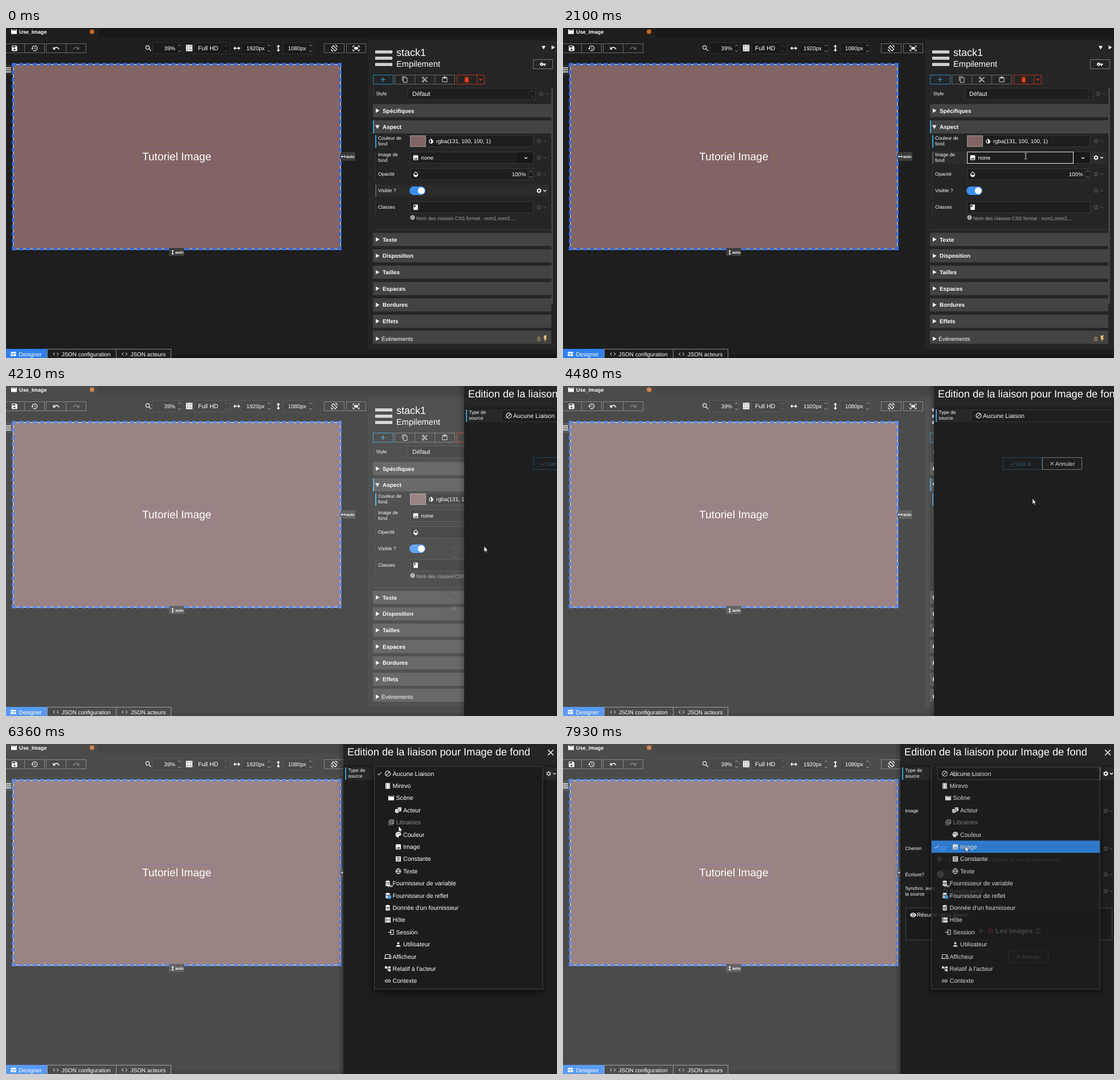
An HTML page for the animation above (8000 ms loop, 967x579 px).

```html
<!DOCTYPE html>
<html lang="fr">
<head>
<meta charset="utf-8">
<title>Liaison d'image</title>
<style>
html, body { margin: 0; width: 100%; height: 100%; overflow: hidden; background: #1e1e1e; }
svg { display: block; font-family: "Liberation Sans", Arial, sans-serif; text-rendering: geometricPrecision; fill-rule: evenodd; }
.b { font-weight: bold; }
.m { font-family: "DejaVu Sans Mono", monospace; }
.e { text-anchor: end; }
</style>
</head>
<body>
<script>
const ICONS = {
  clap: 'M18 4l2 4h-3l-2-4h-2l2 4h-3l-2-4H8l2 4H7L5 4H2v16h20V4z',
  save: 'M17 3H5a2 2 0 0 0-2 2v14a2 2 0 0 0 2 2h14a2 2 0 0 0 2-2V7zM12 19a3 3 0 1 1 0-6 3 3 0 0 1 0 6zm3-10H5V5h10z',
  history: 'M13 3a9 9 0 0 0-9 9H1l4 4 4-4H6a7 7 0 1 1 2 5l-1.4 1.4A9 9 0 1 0 13 3zm-1 5v5l4.3 2.5.7-1.2-3.5-2.1V8z',
  undo: 'M12.5 8c-2.6 0-5 1-6.9 2.6L2 7v9h9l-3.6-3.6A8 8 0 0 1 20 16l2.4-.8A10.5 10.5 0 0 0 12.5 8z',
  redo: 'M11.5 8c2.6 0 5 1 6.9 2.6L22 7v9h-9l3.6-3.6A8 8 0 0 0 4 16l-2.4-.8A10.5 10.5 0 0 1 11.5 8z',
  zoom: 'M15.5 14h-.8l-.3-.3a6.5 6.5 0 1 0-.7.7l.3.3v.8l5 5 1.5-1.5zm-6 0a4.5 4.5 0 1 1 0-9 4.5 4.5 0 0 1 0 9z',
  fit: 'M2 2h20v20H2zM5 5v4l4-4zm10 0l4 4V5zM5 15v4h4zm14 0l-4 4h4zM12 6l-2 3h4zm0 12l2-3h-4zM6 12l3 2v-4zm12 0l-3-2v4z',
  wide: 'M1 12l6-6v4.5h10V6l6 6-6 6v-4.5H7V18z',
  tall: 'M12 1l6 6h-4.5v10H18l-6 6-6-6h4.5V7H6z',
  turn: 'M9 2L2 9l13 13 7-7zM9 5l10 10-4 4L5 9zM15 1a9 9 0 0 1 8 8h-2a7 7 0 0 0-6-6zM9 23a9 9 0 0 1-8-8h2a7 7 0 0 0 6 6z',
  full: 'M1 3h6v2H3v4H1zm16 0h6v6h-2V5h-4zM1 15h2v4h4v2H1zm20 0h2v6h-6v-2h4zM6 8h12v8H6z',
  copy: 'M16 1H4a2 2 0 0 0-2 2v14h2V3h12zm3 4H8a2 2 0 0 0-2 2v14a2 2 0 0 0 2 2h11a2 2 0 0 0 2-2V7a2 2 0 0 0-2-2zm0 16H8V7h11z',
  cut: 'M9.6 7.6A4 4 0 1 0 7.6 9.6L10 12l-2.4 2.4a4 4 0 1 0 2 2L12 14l7 7h3v-1zM6 8a2 2 0 1 1 0-4 2 2 0 0 1 0 4zm0 12a2 2 0 1 1 0-4 2 2 0 0 1 0 4zM19 3l-6 6 2 2 7-7V3z',
  paste: 'M19 3h-4a3 3 0 0 0-6 0H5a2 2 0 0 0-2 2v16h18V5a2 2 0 0 0-2-2zm0 16H5V5h2v3h10V5h2z',
  trash: 'M6 19a2 2 0 0 0 2 2h8a2 2 0 0 0 2-2V7H6zM19 4h-3.5l-1-1h-5l-1 1H5v2h14z',
  key: 'M22 10H12.7a6 6 0 1 0 0 4H15v4h4v-4h3zM7 14a2 2 0 1 1 0-4 2 2 0 0 1 0 4z',
  gear: 'M19.1 12.9a7 7 0 0 0 0-1.9l2-1.6-1.9-3.3-2.4 1a7 7 0 0 0-1.6-.9L14.8 3.6h-3.8l-.4 2.6a7 7 0 0 0-1.6.9l-2.4-1-1.9 3.3 2 1.6a7 7 0 0 0 0 1.9l-2 1.6 1.9 3.3 2.4-1 1.6.9.4 2.6h3.8l.4-2.6 1.6-.9 2.4 1 1.9-3.3zM12.9 15.5a3.5 3.5 0 1 1 0-7 3.5 3.5 0 0 1 0 7z',
  image: 'M21 19V5a2 2 0 0 0-2-2H5a2 2 0 0 0-2 2v14a2 2 0 0 0 2 2h14a2 2 0 0 0 2-2zM8.5 13.5l2.5 3 3.5-4.5 4.5 6H5z',
  half: 'M17.7 7.9L12 2.3 6.3 7.9a8 8 0 1 0 11.4 0zM12 19.6a6 6 0 0 1-4.2-10.2L12 5.1z',
  drop: 'M17.7 8L12 2.3 6.3 8a8 8 0 1 0 11.4 0zM6 14c0-2 .6-3.3 1.8-4.4L12 5.3l4.2 4.3C17.4 10.7 18 12 18 14z',
  book: 'M18 2H6a2 2 0 0 0-2 2v16a2 2 0 0 0 2 2h12a2 2 0 0 0 2-2V4a2 2 0 0 0-2-2zM6 4h5v8l-2.5-1.5L6 12z',
  info: 'M12 2a10 10 0 1 0 0 20 10 10 0 0 0 0-20zm1 15h-2v-6h2zm0-8h-2V7h2z',
  link: 'M3.9 12A3.1 3.1 0 0 1 7 8.9h4V7H7a5 5 0 0 0 0 10h4v-1.9H7A3.1 3.1 0 0 1 3.9 12zM8 13h8v-2H8zm9-6h-4v1.9h4a3.1 3.1 0 0 1 0 6.2h-4V17h4a5 5 0 0 0 0-10z',
  bolt: 'M7 2v11h3v9l7-12h-4l4-8z',
  down: 'M20 12l-1.4-1.4L13 16.2V4h-2v12.2l-5.6-5.6L4 12l8 8z',
  left: 'M12 4l1.4 1.4L7.8 11H21v2H7.8l5.6 5.6L12 20l-8-8z',
  none: 'M12 2a10 10 0 1 0 0 20 10 10 0 0 0 0-20zM4 12a8 8 0 0 1 12.9-6.3L5.7 16.9A8 8 0 0 1 4 12zm8 8a8 8 0 0 1-4.9-1.7L18.3 7.1A8 8 0 0 1 12 20z',
  film: 'M4 2h16v20H4zM6 4v3h2V4zm0 6v3h2v-3zm0 6v3h2v-3zM16 4v3h2V4zm0 6v3h2v-3zm0 6v3h2v-3z',
  masks: 'M10 2h13v8c0 5-4 8-7 7v-7h-6zm4 3v2h2V5zm4 0v2h2V5zM1 8h13v8c0 8-13 8-13 0zm3 4v2h2v-2zm5 0v2h2v-2zm-4 5c1 3 5 3 6 0z',
  books: 'M4 6H2v14a2 2 0 0 0 2 2h14v-2H4zM20 2H8a2 2 0 0 0-2 2v12a2 2 0 0 0 2 2h12a2 2 0 0 0 2-2V4a2 2 0 0 0-2-2zm-1 9H9V9h10zm-4 4H9v-2h6zm4-8H9V5h10z',
  palette: 'M12 2a10 10 0 0 0 0 20c2 0 2.5-1.5 1.5-3s0-3 1.5-3h2a5 5 0 0 0 5-5c0-5-4.5-9-10-9zM5 11a1.5 1.5 0 1 0 3 0 1.5 1.5 0 0 0-3 0zm3-4a1.5 1.5 0 1 0 3 0 1.5 1.5 0 0 0-3 0zm5 0a1.5 1.5 0 1 0 3 0 1.5 1.5 0 0 0-3 0zm3 4a1.5 1.5 0 1 0 3 0 1.5 1.5 0 0 0-3 0z',
  list: 'M3 3h18v18H3zM6 6v2h12V6zm0 5v2h12v-2zm0 5v2h12v-2z',
  base: 'M4 6c0-5 16-5 16 0s-16 5-16 0zm0 3c2 4 14 4 16 0v3c0 5-16 5-16 0zm0 5c2 4 14 4 16 0v4c0 5-16 5-16 0z',
  host: 'M2 3h20v8H2zm2 2v4h3V5zM2 13h20v8H2zm2 2v4h3v-4z',
  login: 'M9 3h12v18H9v-4h2v2h8V5h-8v2H9zM1 11h9L7.5 8.5 9 7l5 5-5 5-1.5-1.5L10 13H1z',
  user: 'M12 4a4 4 0 1 1 0 8 4 4 0 0 1 0-8zM4 20c0-8 16-8 16 0z',
  screens: 'M4 6h18V4H4a2 2 0 0 0-2 2v11H0v3h14v-3H4zM23 8h-6a1 1 0 0 0-1 1v10a1 1 0 0 0 1 1h6a1 1 0 0 0 1-1V9a1 1 0 0 0-1-1zm-1 9h-4v-7h4z',
  tree: 'M22 11V3h-7v3H9V3H2v8h7V8h2v10h4v3h7v-8h-7v3h-2V8h2v3z',
  check: 'M9 16.2L4.8 12l-1.4 1.4L9 19 21 7l-1.4-1.4z',
  close: 'M19 6.4L17.6 5 12 10.6 6.4 5 5 6.4 10.6 12 5 17.6 6.4 19 12 13.4 17.6 19 19 17.6 13.4 12z',
  eye: 'M12 4.5C7 4.5 2.7 7.6 1 12c1.7 4.4 6 7.5 11 7.5s9.3-3.1 11-7.5c-1.7-4.4-6-7.5-11-7.5zM12 17a5 5 0 1 1 0-10 5 5 0 0 1 0 10zm0-8a3 3 0 1 0 0 6 3 3 0 0 0 0-6z',
  tiles: 'M2 4h20v6H2zM2 12h9v8H2zM13 12h9v8h-9z',
  sync: 'M12 4V1L8 5l4 4V6a6 6 0 0 1 5.2 9l1.5 1.5A8 8 0 0 0 12 4zm0 14a6 6 0 0 1-5.2-9L5.3 7.5A8 8 0 0 0 12 20v3l4-4-4-4z'
};

// Markup helpers
const rect = (x, y, w, h, fill = 'none', stroke = 'none', extra = '') =>
  `<rect x="${x}" y="${y}" width="${w}" height="${h}" fill="${fill}" stroke="${stroke}" ${extra}/>`;
const box = (x, y, w, h, fill, stroke = '#383838') => rect(x + .5, y + .5, w - 1, h - 1, fill, stroke);
const text = (x, y, size, s, fill = '#fff', cls = '') =>
  `<text x="${x}" y="${y}" font-size="${size}" fill="${fill}" class="${cls}">${s}</text>`;
const line = (d, color = '#fff', w = 1, extra = '') =>
  `<path d="${d}" fill="none" stroke="${color}" stroke-width="${w}" ${extra}/>`;
const fillPath = (d, color = '#fff') => `<path d="${d}" fill="${color}"/>`;
const dot = (x, y, r, color) => `<circle cx="${x}" cy="${y}" r="${r}" fill="${color}"/>`;
const group = (id, s) => `<g id="${id}">${s}</g>`;
const icon = (name, x, y, size = 12, color = '#fff') =>
  `<path transform="translate(${x - size / 2} ${y - size / 2}) scale(${size / 24})" fill="${color}" d="${ICONS[name]}"/>`;
const chevron = (x, y, color, r = 2.5) => line(`M${x - r} ${y - r / 2}l${r} ${r}l${r} ${-r}`, color, 1.2);
const spin = (x, y, color = '#bbb') =>
  line(`M${x - 2.2} ${y - 4}l2.2-2.2 2.2 2.2M${x - 2.2} ${y + 4}l2.2 2.2 2.2-2.2`, color);
const gear = (x, y, color = '#484848') => icon('gear', x, y, 12, color) + chevron(x + 10.5, y, color);
const DARK = '#1e1e1e';

// Dashed border whose sides each begin and end with a whole dash
function dashes(x, y, w, h, color, size) {
  const side = (d, len) => {
    const n = Math.floor((len + size) / (size * 3));
    return line(d, color, size, `stroke-dasharray="${size * 2} ${(len - n * size * 2) / (n - 1)}"`);
  };
  const m = size / 2;
  return side(`M${x} ${y + m}h${w}`, w) + side(`M${x} ${y + h - m}h${w}`, w) +
    side(`M${x + m} ${y}v${h}`, h) + side(`M${x + w - m} ${y}v${h}`, h);
}

function toolbar() {
  const btn = (x, w, name, c = '#fff') => box(x, 27, w, 17, 'none', '#6a6a6a') + icon(name, x + w / 2, 35.5, 13, c);
  const field = (x, w, s) => box(x, 25, w, 21, '#1a1a1a', '#303030') +
    text(x + w - 13, 39, 9.78, s, '#fff', 'e') + spin(x + w - 5.5, 35.5);
  return rect(162, 0, 805, 16, '#181818') +
    icon('clap', 14, 6.5, 12) + text(23, 10, 9.2, 'Use_Image', '#fff', 'b') + dot(151, 6.5, 4, '#cb661d') +
    btn(-3, 36, 'save') + btn(32, 36, 'history') + btn(70, 36, 'undo') + btn(105, 36, 'redo', '#666') +
    icon('zoom', 250, 35.5, 14) + field(257, 53, '39%') + icon('fit', 321.5, 35, 13.5) +
    box(330, 25, 63, 21, '#1a1a1a', '#303030') + text(337, 39, 10.67, 'Full HD') + spin(385.5, 35.5, '#555') +
    icon('wide', 405, 35.5, 13) + field(413, 54, '1920px') + icon('tall', 478, 35.5, 13) + field(486, 54, '1080px') +
    btn(558, 36, 'turn') + btn(597, 35, 'full');
}

function stage() {
  return rect(0, 65, 11, 17, '#333') + line('M0 70H9M0 73.5H9M0 77H9', '#fff', 1.4) +
    rect(12, 63, 576, 326, '#836464') +
    rect(13, 64, 574, 324, 'none', '#d0cac4', 'stroke-width="1.5"') +
    dashes(10.5, 61.5, 578.5, 328.5, '#3a6fdc', 4) +
    rect(238.5, 211.5, 123, 29, 'none', '#6450aa', 'stroke-opacity=".45"') +
    text(239, 232, 19.1, 'Tutoriel Image') +
    rect(587, 218, 26, 15, '#3c3c3c') + icon('wide', 592, 225.5, 9) + text(597, 228, 6.8, 'auto', '#fff', 'b') +
    rect(286, 386, 27, 14, '#3c3c3c') + icon('tall', 292.5, 393.5, 9) + text(297, 396, 6.8, 'auto', '#fff', 'b');
}

function tabs() {
  const code = x => line(`M${x - 2} 569.5l-2.5 2.5 2.5 2.5M${x + 2} 569.5l2.5 2.5-2.5 2.5`);
  return rect(290, 574, 677, 5, '#171416') + rect(0, 563, 72, 16, '#2f80ee') +
    icon('tiles', 13, 572, 11) + text(22.5, 575.5, 10, 'Designer') +
    box(72, 563, 122, 18, 'none', '#888') + code(87.5) + text(97.5, 575.5, 9.92, 'JSON configuration') +
    box(193, 563, 97, 18, 'none', '#888') + code(208) + text(218.5, 575.5, 9.92, 'JSON acteurs');
}

// Property rows: centre, label lines, input width (0 = none)
const ROWS = [
  { y: 115.5, label: ['Style'], x: 705, w: 225, gx: 939 },
  { y: 198.5, label: ['Couleur de', 'fond'], w: 217 },
  { y: 227.5, label: ['Image de', 'fond'], w: 187 },
  { y: 256.5, label: ['Opacité'], w: 217 },
  { y: 285.5, label: ['Visible ?'], w: 0 },
  { y: 314.5, label: ['Classes'], w: 217 }
];
const labels = (x, y, lines) => lines.length > 1
  ? text(x, y - 2.2, 8.4, lines[0]) + text(x, y + 7.6, 8.4, lines[1])
  : text(x, y + 2.5, 8.4, lines[0]);

function propRow({ y, label, x = 709, w, gx = 935 }, i) {
  const top = y - 10.5;
  return rect(i ? 648 : 645, top, 1, i === 5 ? 28 : 21, '#363636') +
    group('hover' + i, rect(648, top, 305, 21, '#2c2c2c') + rect(648, top, 2, 21, '#5a5a5a')) +
    (i === 1 ? rect(648, top, 2, 22, '#3a9fd8') : '') +
    labels(i ? 653 : 649.5, y, label) + (w ? box(x, top, i === 2 ? 217 : w, 21, DARK) : '') +
    group('gear' + i, gear(gx, y)) + group('gearOn' + i, gear(gx, y, '#fff')) +
    (w ? group('focus' + i, rect(x + .5, top + .5, w - 1, 20, 'none', '#e8e8e8')) : '');
}

function inspector() {
  const btn = (x, w, color) => box(x, 82, w, 17, 'none', color);
  const header = (y, s, open) => rect(644, y - 11.5, 313, 23, '#434343') +
    fillPath(open ? `M648 ${y - 3}h7.5l-3.7 6.5z` : `M649 ${y - 3.7}v7.4l6.5-3.7z`) +
    text(661, y + 3.5, 9.92, s, '#fff', 'b');
  const names = ['Texte', 'Disposition', 'Tailles', 'Espaces', 'Bordures', 'Effets'];
  return rect(635, 22, 332, 541, '#252525') +
    fillPath('M940 31.5h7l-3.5 6z') + fillPath('M957.5 30.5v7l6-3.5z') +
    [39.5, 50.5, 61.5].map(y => rect(648, y, 30, 5, '#eee') + rect(649, y + 2, 28, 1, '#999')).join('') +
    text(685, 49, 18, 'stack1') + text(685, 68, 14.6, 'Empilement') +
    box(925, 55, 35, 17, 'none', '#777') + icon('key', 942.5, 63.5, 12) +
    btn(644, 36, '#2a86b8') + line('M657.5 90.5h8M661.5 86.5v8', '#3ba3e0', 1.2) +
    btn(682, 36, '#666') + btn(717, 36, '#666') + btn(752, 36, '#666') +
    icon('copy', 700, 90.5, 12, '#ccc') + icon('cut', 735, 90.5, 12, '#ccc') + icon('paste', 770, 90.5, 12, '#ccc') +
    btn(791, 36, '#b8321a') + btn(826, 14, '#b8321a') + icon('trash', 808.5, 90.5, 13, '#ff3b14') + chevron(833, 90.5, '#ff3b14') +
    header(145, 'Spécifiques') + header(173.5, 'Aspect', true) + rect(644, 162, 2, 23, '#3a9fd8') +
    ROWS.map(propRow).join('') +
    text(713, 119, 10.67, 'Défaut') + spin(923, 115.5, '#555') +
    rect(709.5, 189, 27, 19, '#836464', '#999') + icon('half', 746, 198.5, 11) + text(755, 202, 9.7, 'rgba(131, 100, 100, 1)') +
    icon('image', 719, 227.5, 11.5) + text(728.5, 231, 9.7, 'none') + rect(897, 218, 28, 19, '#171717') + chevron(912.5, 228, '#eee') +
    icon('drop', 719, 256.5, 12) + text(912.5, 260, 9.7, '100%', '#fff', 'e') + line('M916.5 247v19', '#383838') + spin(921, 256.5, '#999') +
    rect(708, 278, 28, 15, '#3c8ff0', 'none', 'rx="7.5"') + dot(728.8, 285.5, 6, '#fff') +
    icon('book', 719, 314.5, 11.5) + icon('info', 713.5, 332.5, 10, '#aaa') +
    text(720, 336.5, 8.58, 'Nom des classes CSS format : nom1,nom2,...', '#aaa') +
    line('M644 353.5h313', '#3a3a3a') +
    names.map((s, i) => header(371 + i * 28.7, s)).join('') +
    rect(644, 531, 313, 23, '#434343') + fillPath('M649 541.5v7.4l6.5-3.7z') + text(659, 548.5, 10, 'Événements') +
    text(938, 549, 10.5, '0', '#f0c47c', 'e') + icon('bolt', 946.5, 545, 13, '#f0c47c') +
    rect(957, 105, 3, 379, '#454545');
}

function menu() {
  const item = (y, name, s, c = '#fff') => icon(name, 786, y, 12, c) + text(798.5, y + 3.7, 10.67, s, c);
  return rect(762.5, 241.5, 186, 162, DARK, '#3c3c3c', 'filter="url(#shadow)"') +
    group('menuHover', rect(763, 273, 180, 21, '#343434')) +
    [269, 319, 348, 376].map(y => line(`M763 ${y - .5}h185`, '#3c3c3c')).join('') +
    rect(943, 273, 5, 42, '#9a2fcf') + rect(943, 322, 5, 22, '#f2d36b') +
    item(254.5, 'close', 'Réinitialiser', '#8c8c8c') + item(283, 'link', 'Lier à...') + item(304, 'paste', 'Coller la liaison') +
    item(333, 'bolt', "Ajouter l'év.") + text(859, 336.5, 8.55, 'onValueChanged', '#fff', 'm') +
    item(361, 'down', "Montrer l'héritage") + icon('info', 786, 389.5, 12) +
    text(798.5, 392.5, 8.64, 'properties.backgroundImage') + icon('copy', 933, 389.5, 12);
}

function actions(y) {
  return box(713, y, 69, 22, 'none', '#24475f') + icon('check', 731, y + 11, 11, '#2d5d7e') + text(737, y + 14.5, 10, 'Lier à...', '#2d5d7e') +
    box(782, y, 70, 22, 'none', '#777') + icon('close', 799, y + 11, 10, '#ddd') + text(805, y + 14.5, 10, 'Annuler', '#ddd');
}

function binding() {
  const field = (y, lines) => labels(600.5, y, lines) + gear(952, y);
  const select = y => box(657, y - 10.5, 286, 22, DARK) + spin(936, y, '#666');
  return rect(582, 0, 10, 579, 'url(#fade)') + rect(592, 0, 375, 579, DARK) + rect(592, 0, 375, 37, '#252525') +
    text(599, 20, 18.27, 'Edition de la liaison pour Image de fond') + icon('close', 956, 15, 18) +
    rect(595, 41, 372, 22, '#282828') + rect(595, 41, 2, 22, '#3a9fd8') +
    labels(600.5, 51.5, ['Type de', 'source']) + select(52) + gear(952, 52, '#ccc') +
    group('typeHover', rect(657.5, 41.5, 285, 21, 'none', '#e8e8e8') + gear(952, 52, '#fff')) +
    group('formNone', icon('none', 670.5, 52, 12) + text(678, 55.5, 10.67, 'Aucune Liaison') + actions(125)) +
    group('formImage', icon('image', 688, 52, 12) + text(697, 55.5, 10.67, 'Image') +
      select(117.5) + field(117.5, ['Image']) +
      box(657, 173, 286, 21, DARK) + field(183.5, ['Chemin']) + icon('list', 667, 183, 11, '#4aa0e0') +
      icon('info', 661, 202, 10, '#aaa') + text(670, 206, 8.58, 'Clé de la ressource à laquelle le champ cible sera lié', '#aaa') +
      field(229, ['Écriture?']) + rect(656.5, 221.5, 27, 14, '#333', '#777', 'rx="7"') + dot(662.5, 228.5, 6, '#ccc') +
      select(258) + field(258, ['Synchro. avec', 'la source']) + icon('sync', 671, 258, 11) + text(678.5, 261.5, 10.67, 'Synchronisé') +
      box(601, 287, 363, 57, '#1b1b1b', '#444') + icon('eye', 614.5, 300, 12) + text(621, 303, 9.8, 'Résumé de la liaison') +
      icon('left', 734, 328, 12) + icon('image', 750, 328, 12, '#d8365a') + text(759, 332, 11.9, 'Les images', '#fff', 'b') +
      icon('sync', 834, 328, 12) + actions(362));
}

const STEP = 21.4;
const SOURCES = [
  [0, 'none', 'Aucune Liaison'], [0, 'film', 'Mirevo'], [1, 'clap', 'Scène'], [2, 'masks', 'Acteur'],
  [1, 'books', 'Librairies'], [2, 'palette', 'Couleur'], [2, 'image', 'Image'], [2, 'list', 'Constante'],
  [2, 'globe', 'Texte'], [0, 'base', 'Fournisseur de variable'], [0, 'base', 'Fournisseur de reflet'],
  [0, 'base', "Donnée d'un fournisseur"], [0, 'host', 'Hôte'], [1, 'login', 'Session'], [2, 'user', 'Utilisateur'],
  [0, 'screens', 'Afficheur'], [0, 'tree', "Relatif à l'acteur"], [0, 'link', 'Contexte']
];
function dropdown() {
  return rect(646.5, 39, 295.5, 391, '#1e1e1e', '#444', 'filter="url(#shadow)"') +
    group('pick', rect(647, 41, 295, 21.5, '#338ef0')) +
    group('tick', icon('check', 655.5, 52, 10.5)) +
    SOURCES.map(([level, name, s], i) => {
      const x = [670, 676, 688.5][level], y = 52 + i * STEP, c = i === 4 ? '#909090' : '#fff';
      const mark = name === 'globe'
        ? line(`M${x - 4.5} ${y}a4.5 4.5 0 1 0 9 0a4.5 4.5 0 1 0-9 0h9M${x} ${y - 4.5}c-3 3-3 6 0 9c3-3 3-6 0-9`)
        : icon(name, x, y, 12, c);
      const badge = i === 9 ? text(x - 1, y + 6, 6.5, 'Var', '#fff', 'b') : i === 10 ? dot(x + 3, y + 2.5, 3.2, '#45a5e8') : '';
      return mark + badge + text(x + 8.5, y + 3.5, 10.67, s, c);
    }).join('');
}

document.body.innerHTML = `<svg width="967" height="579" viewBox="0 0 967 579">
<defs>
<linearGradient id="fade"><stop offset="0" stop-opacity="0"/><stop offset="1" stop-opacity=".2"/></linearGradient>
<filter id="shadow" x="-20%" y="-20%" width="140%" height="140%"><feDropShadow dx="0" dy="4" stdDeviation="6" flood-opacity=".65"/></filter>
</defs>` +
  rect(0, 0, 967, 579, DARK) + toolbar() + stage() + inspector() + tabs() +
  group('menu', menu()) + group('veil', rect(0, 0, 967, 579, '#fff', 'none', 'fill-opacity=".2"')) +
  group('binding', binding()) + group('dropdown', dropdown()) +
  group('arrow', '<path d="M0 0V10L2.2 8 3.8 11.4 5.3 10.7 3.8 7.4H6.8z" fill="#fff" stroke="#000" stroke-width=".6"/>') +
  group('beam', line('M-2-5h1.5L0-4.5.5-5H2M0-4.5v9M-2 5h1.5L0 4.5.5 5H2', '#ddd')) + '</svg>';

const el = {};
document.querySelectorAll('g[id]').forEach(g => el[g.id] = g);
const alpha = (id, a) => el[id].setAttribute('opacity', +a);
const move = (id, x, y) => el[id].setAttribute('transform', `translate(${x} ${y})`);
const ramp = (t, a, b) => Math.min(1, Math.max(0, (t - a) / (b - a)));
const smooth = p => p * p * (3 - 2 * p);

// Pointer stops: time, x, y
const PATH = [
  [460, 829, 562], [1000, 822, 116], [1210, 820, 168], [1280, 820, 168], [2030, 812, 225], [2100, 812, 225],
  [2440, 926, 229], [3260, 926, 229], [3680, 839, 281], [4210, 839, 281], [4760, 808, 110], [4830, 808, 110],
  [5080, 803, 48], [5580, 803, 48], [5970, 745, 270], [6360, 689, 144], [6430, 689, 144], [6950, 708, 186],
  [7190, 706, 179], [8000, 706, 179]
];
function pointer(t) {
  const i = Math.max(1, PATH.findIndex(p => p[0] > t));
  const [a, x0, y0] = PATH[i - 1], [b, x1, y1] = PATH[i];
  const p = smooth(ramp(t, a, b));
  return [x0 + (x1 - x0) * p, y0 + (y1 - y0) * p];
}

function draw(t) {
  const [x, y] = pointer(t);
  const shown = t >= 460, editing = t >= 4010;

  const over = editing ? -1 : !shown ? 4 : t >= 2440 ? 2 : ROWS.findIndex(r => Math.abs(r.y - y) < 11);
  const typing = shown && over > 0 && ROWS[over].w > 0 && x < 709 + ROWS[over].w;
  ROWS.forEach((r, i) => {
    alpha('hover' + i, i === over);
    alpha('gear' + i, i !== over);
    alpha('gearOn' + i, i === over);
    if (r.w) alpha('focus' + i, i === over && typing);
  });
  el.gearOn2.querySelectorAll('path').forEach((p, i) =>
    p.setAttribute(i ? 'stroke' : 'fill', x > 921 || t > 2840 ? '#3f8fee' : '#fff'));

  alpha('menu', ramp(t, 2800, 2980) * (1 - ramp(t, 4010, 4225)));
  alpha('menuHover', y > 272 && y < 295);

  alpha('veil', ramp(t, 3990, 4180));
  const slide = 1 - (1 - ramp(t, 4024, 4780)) ** 2;
  alpha('binding', editing);
  move('binding', Math.round(375 * (1 - slide)), 0);
  alpha('typeHover', (t > 4830 && t < 5170 && y < 63) || t > 7600);

  const chosen = t >= 7460, item = Math.floor((y - 41) / STEP);
  alpha('formNone', t < 7660);
  alpha('formImage', ramp(t, 7600, 7800));
  alpha('dropdown', ramp(t, 5130, 5330) - .18 * ramp(t, 7800, 7930));
  alpha('pick', item !== 4);
  move('pick', 0, item * STEP);
  move('tick', 0, chosen ? 6 * STEP : 0);

  alpha('arrow', shown && !typing);
  alpha('beam', typing);
  move('arrow', x, y);
  move('beam', x, y);
}

const start = performance.now();
(function tick() {
  draw((performance.now() - start) % 8000);
  requestAnimationFrame(tick);
})();
</script>
</body>
</html>
```
